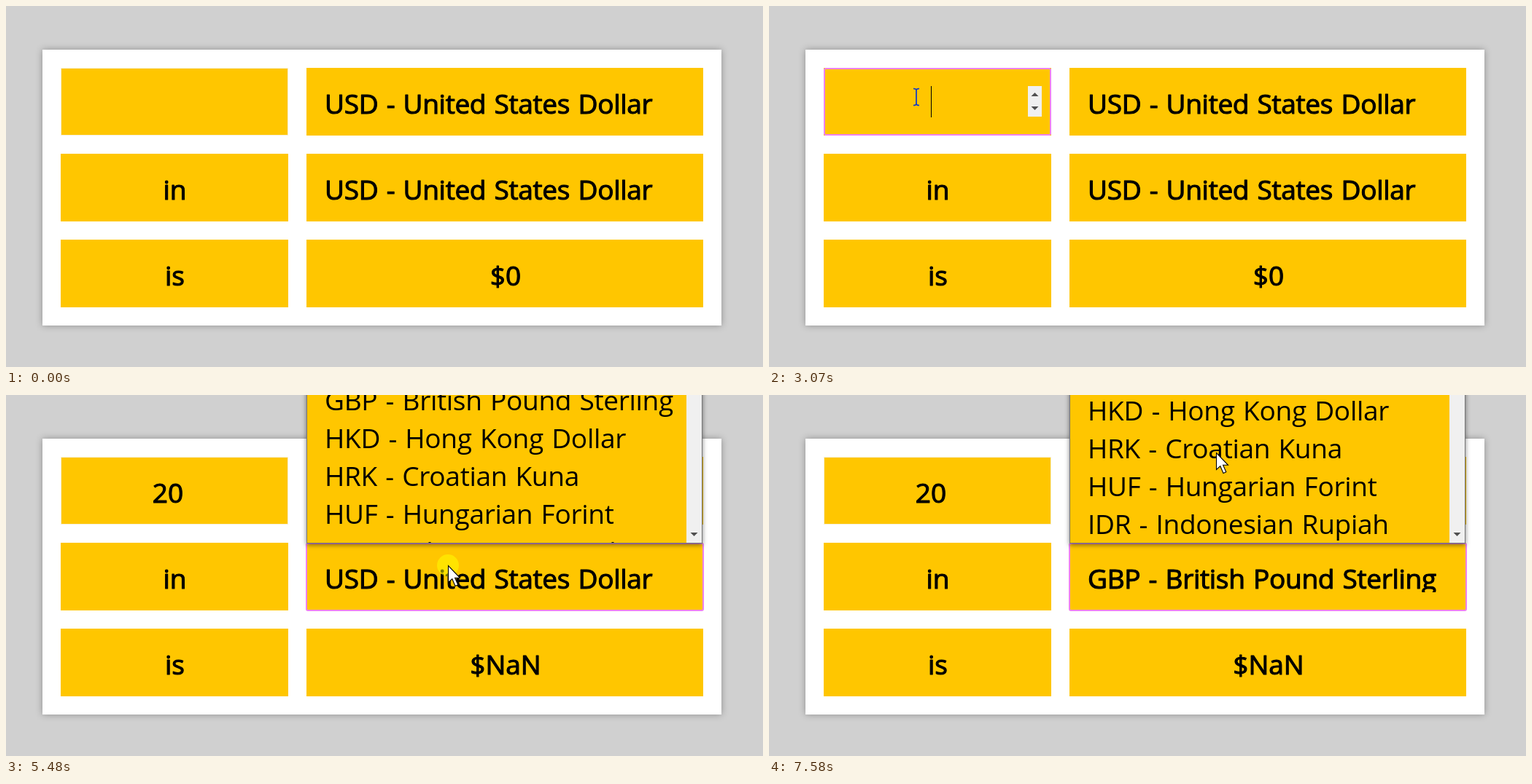
Recreate the animation shown at these times as an HTML page. Size 1038 px wide and 496 px high, loop 8000 ms.

```html
<!DOCTYPE html>
<html lang="en">
<head>
<meta charset="utf-8">
<title>Currency converter</title>
<style>
  html, body { margin: 0; width: 100%; height: 100%; overflow: hidden; background: #d0d0d0; }
  svg { display: block; width: 100%; height: 100%; }
  text {
    font: 400 37px "Open Sans", "Noto Sans", sans-serif;
    letter-spacing: -.3px; word-spacing: 2px; white-space: pre;
  }
  .semi { stroke: #000; stroke-width: 1.1px; stroke-linejoin: round; }
  .mid { text-anchor: middle; letter-spacing: 0; }
  .cell { fill: #ffc600; }
  .focus { fill: none; stroke: #ee82ee; stroke-width: 2px; }
  .card { fill: #fff; filter: drop-shadow(0 0 5px rgba(0, 0, 0, .32)); }
  .popup { filter: drop-shadow(0 2px 3px rgba(0, 0, 0, .5)); }
</style>
</head>
<body>
<svg viewBox="0 0 1038 496" preserveAspectRatio="none">
  <defs>
    <clipPath id="listClip"><rect x="413" y="0" width="520" height="203"/></clipPath>
    <clipPath id="selectClip"><rect x="412" y="203" width="544" height="68"/></clipPath>
  </defs>
  <rect class="card" x="50" y="60" width="931" height="379"/>
  <g id="cells"></g>

  <rect id="inputEdge" x="75.5" y="85.5" width="311" height="92" fill="none" stroke="#f7efd6"/>
  <rect id="inputFocus" class="focus" x="76" y="86" width="310" height="91" rx="2"/>
  <text id="amount" class="semi mid" x="222" y="147.5"></text>
  <rect id="caret" y="110" width="1" height="43"/>
  <g id="spinner">
    <rect x="355" y="110" width="19" height="42" fill="#f0f0f0"/>
    <path d="M359.5 124l5-5 5 5zM359.5 138l5 5 5-5z" fill="#505050"/>
  </g>

  <text class="semi" x="437" y="147.5">USD - United States Dollar</text>
  <g clip-path="url(#selectClip)"><text id="target" class="semi" x="437" y="265.5"></text></g>
  <rect id="selectFocus" class="focus" x="412" y="204" width="544" height="92" rx="2"/>
  <text class="semi mid" x="231.5" y="265.5">in</text>
  <text class="semi mid" x="231.5" y="383.5">is</text>
  <text id="result" class="semi mid" x="685" y="383.5"></text>

  <g id="popup" class="popup">
    <rect x="412.5" y="-20" width="542" height="223.5" fill="#ffc600" stroke="#767676"/>
    <g clip-path="url(#listClip)"><g id="list"></g></g>
    <rect x="933" y="-20" width="21" height="223" fill="#f0f0f0"/>
    <path d="M938.5 189h10l-5 5z" fill="#505050"/>
  </g>

  <circle id="ring" r="15" fill="#ff0" fill-opacity=".5"/>
  <path id="beam" d="M-4 -11.5Q0 -11.5 0 -9Q0 -11.5 4 -11.5M0 -9V9M-4 11.5Q0 11.5 0 9Q0 11.5 4 11.5"
        fill="none" stroke="#0a38cc" stroke-width="1.7"/>
  <path id="arrow" d="M.5 .5V23.5L5.8 18.7L10 28.5L13.8 26.8L9.6 17.3H16.5Z" fill="#fff" stroke="#000" stroke-width="1.1"/>
</svg>
<script>
const $ = id => document.getElementById(id);
const LOOP = 8000, ROW = 52, FIRST_TOP = -58;
const items = ["GBP - British Pound Sterling", "HKD - Hong Kong Dollar", "HRK - Croatian Kuna",
               "HUF - Hungarian Forint", "IDR - Indonesian Rupiah"];

function add(parent, tag, attrs, label) {
  const el = document.createElementNS("http://www.w3.org/2000/svg", tag);
  for (const key in attrs) el.setAttribute(key, attrs[key]);
  if (label) el.textContent = label;
  return parent.appendChild(el);
}

for (const y of [85, 203, 321]) {
  add($("cells"), "rect", { class: "cell", x: 75, y, width: 312, height: 93 });
  add($("cells"), "rect", { class: "cell", x: 412, y, width: 544, height: 93 });
}

const rows = items.map((label, i) => {
  const top = FIRST_TOP + i * ROW;
  return {
    top,
    back: add($("list"), "rect", { x: 413, y: top, width: 520, height: ROW }),
    text: add($("list"), "text", { x: 437, y: top + 40.8 }, label)
  };
});

const within = (t, a, b) => t >= a && t < b;
const show = (id, on) => $(id).setAttribute("visibility", on ? "visible" : "hidden");
const mix = (a, b, p) => a + (b - a) * p;
const bend = (a, c, b, p) => mix(mix(a, c, p), mix(c, b, p), p);
const smooth = p => p * p * (3 - 2 * p);
// The screen is sampled in ticks, give or take 10 ms; returns the tick reached, 1 to n.
const tick = (t, start, end, n) =>
  Math.min(n, Math.floor((t - start + 10) / ((end - start) / (n - 1))) + 1);

function pointer(t) {
  if (t < 1280) return null;
  if (t < 1740) {
    const p = (tick(t, 1280, 1590, 5) - 1) / 4, e = 1 - (1 - p) ** 1.5;
    return [mix(411, 194, e), mix(432, 98, e)];
  }
  if (t < 4560) {
    const p = tick(t, 1740, 1820, 2) / 2;
    return [mix(194, 202, p), mix(98, 125, p)];
  }
  if (t < 6110) {
    const p = smooth(tick(t, 4560, 5330, 11) / 11);
    return [bend(202, 430, 606, p), bend(125, 72, 234, p)];
  }
  const k = tick(t, 6110, 6580, 7);
  return [606 + k, 78.6 + 155.4 * 0.468 ** k];
}

function render(t) {
  const pos = pointer(t), open = t >= 5480;
  const [x, y] = pos ? pos.map(Math.round) : [-99, -99];
  const overInput = !open && x >= 75 && x < 387 && y >= 85 && y < 178;
  const beam = overInput && x < 355;
  const focused = within(t, 1970, 5480);

  show("beam", pos && beam);
  show("arrow", pos && !beam);
  for (const id of ["beam", "arrow", "ring"]) $(id).setAttribute("transform", `translate(${x} ${y})`);
  show("ring", within(t, 1970, 2060) || within(t, 5480, 5560));

  const amount = t < 3940 ? "" : t < 4010 ? "2" : "20";
  $("amount").textContent = amount;
  $("result").textContent = amount ? "$NaN" : "$0";
  $("target").textContent = t < 7580 ? "USD - United States Dollar" : items[0];

  show("inputEdge", !focused);
  show("inputFocus", focused);
  show("spinner", focused || overInput);
  $("caret").setAttribute("x", 222 + amount.length * 10);
  const blinkedOff = within(t, 2520, 3070) || within(t, 3620, 3940) || within(t, 4560, 5100);
  show("caret", focused && !blinkedOff);

  show("selectFocus", open);
  show("popup", open);
  // Hovering the half-hidden last row scrolls it into view.
  $("list").setAttribute("transform", `translate(0 ${t < 6110 ? 38 : 0})`);
  for (const row of rows) {
    const hot = within(t, 6110, 7500) && within(y, row.top, row.top + ROW);
    row.back.setAttribute("fill", hot ? "#1e90ff" : "#ffc600");
    row.text.setAttribute("fill", hot ? "#fff" : "#000");
  }
}

const began = performance.now();
function frame() {
  render((performance.now() - began) % LOOP);
  requestAnimationFrame(frame);
}
frame();
</script>
</body>
</html>
```
